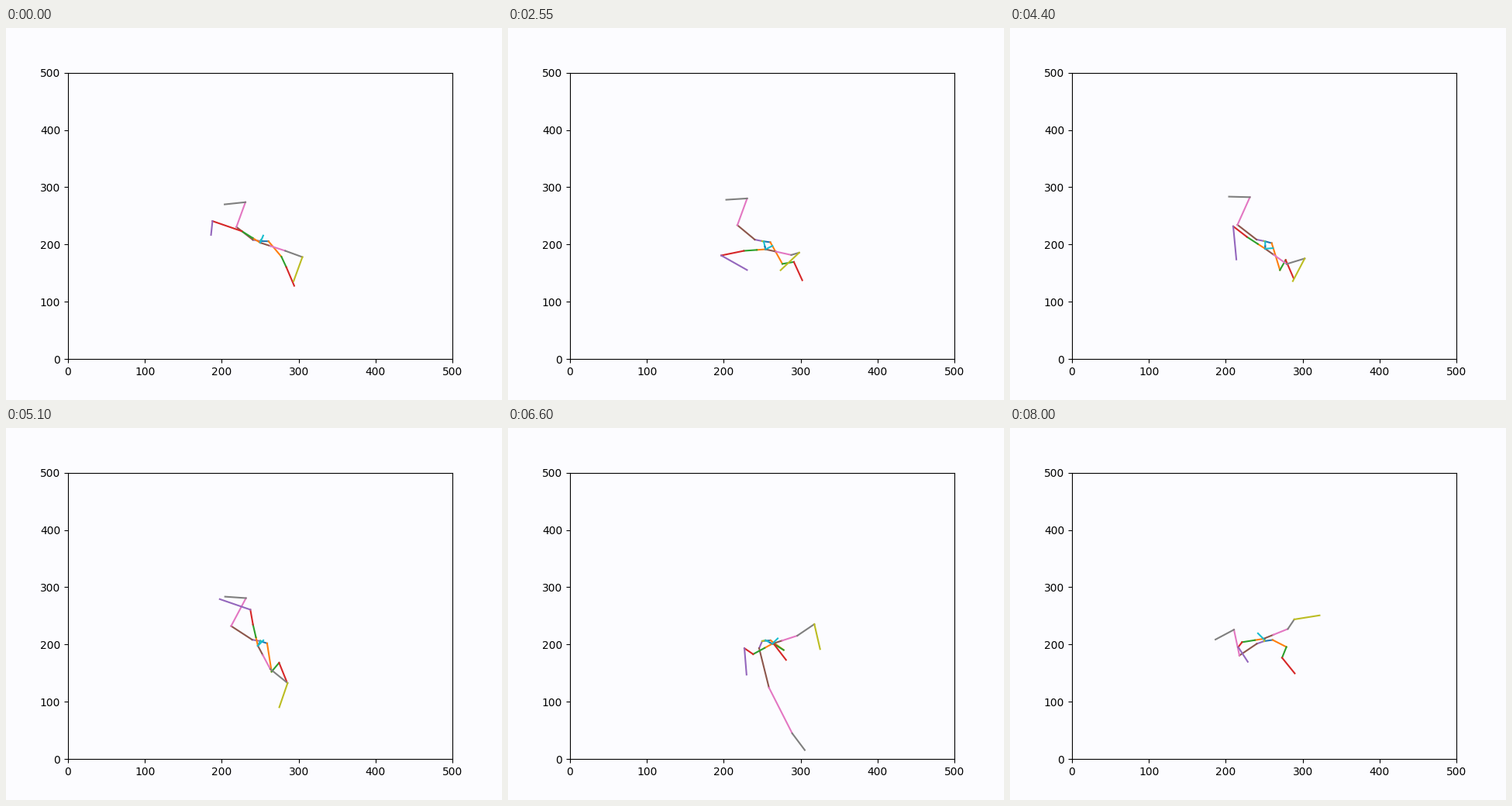
Animation of 640 by 480 pixels, one loop 8.05 s. Source, as a matplotlib script:

```python
import numpy as np
import matplotlib.pyplot as plt
from matplotlib.animation import FuncAnimation

W, H, DPI = 640, 480, 100
FRAMES, STEP = 161, 50
PAPER = "#fcfcff"

POSES = (0, 1.55, 3.65, 5.1, 6, 7.2, 8)  # seconds
KICK = (0, 3.65, 5.1, 6, 6.8, 7.2, 8)
ROOT = np.array([328, 275])


def track(values, times=POSES):
    """Smooth curve through the key values that never overshoots them."""
    t, p = np.array(times, float), np.array(values, float)
    h = np.diff(t)
    d = np.diff(p) / h
    same = d[:-1] * d[1:] > 0
    m = np.r_[d[0], np.where(same, 2 * d[:-1] * d[1:]
                             / np.where(same, d[:-1] + d[1:], 1), 0), d[-1]]

    def at(s):
        i = min(np.searchsorted(t, s, side="right") - 1, len(t) - 2)
        u = (s - t[i]) / h[i]
        return ((1 + 2 * u) * (1 - u) ** 2 * p[i] + u * (1 - u) ** 2 * h[i] * m[i]
                + u * u * (3 - 2 * u) * p[i + 1] + u * u * (u - 1) * h[i] * m[i + 1])

    return at


# Angles are in degrees, clockwise from the right; lengths are in pixels.
chest_x = track((0, 2, 6, -3, 22, 2, -1))
chest_y = track((2, 6, 14, 6, 12, -5, -3))
head_turn = track((-67, -85, 41, -45, 56, -145, -135))

l_thigh = track((50, 59, 63, 81, 41, 33, 27))
l_reach = track((26, 29, 35, 37, 28, 17, 20))
l_shin = track((65, 52, -72, -50, -156, -141, -248))
l_foot = track((67, 66, 65, 68, 53, 52, 51))

r_thigh = track((218, 220, 213, 197, 55, 60, 146), KICK)
r_shin = track((290, 290, 298, 231, 37, 40, 258), KICK)
r_foot = track((174, 178, 184, 180, 30, 71, 152), KICK)
r_reach = track((1, 1.12, 1.2, 1.87, 1.95, 1.45, 1), KICK)

l_shoulder = track((212, 193, 164, 257, 121, 182, 171))
l_upper = track((199, 168, 170, 260, 234, 189, 127))
l_fore = track((96, 52, 16, 199, 359, 491, 417))

r_shoulder = track((18, 18, 6, 62, -25, -11, -22))
r_upper = track((20, 38, -79, 39, -95, 27, -56))
r_fore = track((110, 143, 124, 109, 59, 95, -9))


def polar(length, angle):
    a = np.radians(angle)
    return length * np.array([np.cos(a), np.sin(a)])


def leg(side, thigh, shin, foot):
    """The hip gives way a little in the direction of the thigh."""
    hip = np.array(side) + 0.16 * thigh
    return ROOT + np.cumsum([(0, 0), hip, thigh, shin, foot], axis=0)


def arm(chest, shoulder, upper, fore):
    return chest + np.cumsum([(0, 0), 0.4 * shoulder, 0.6 * shoulder, upper, fore],
                             axis=0)


def chains(s):
    lean = np.array([chest_x(s), chest_y(s)])
    chest = ROOT + lean
    spine = ROOT + 0.25 * lean + (1, -2)
    thorax = spine + 0.65 * (chest - spine)
    reach = r_reach(s)
    # Foreshortening of the arms as the body turns.
    l_up = 40 - 4 * s
    l_low = 18 + 25 * np.sin(np.pi * s / 8.5)
    r_up = 20 - 10 * np.sin(2 * np.pi * (s - 0.4) / 7)
    return [
        leg((8, -3), polar(l_reach(s), l_thigh(s)), polar(15, l_shin(s)),
            polar(26, l_foot(s))),
        leg((-6, 1), polar(27 * reach, r_thigh(s)), polar(34 * reach, r_shin(s)),
            polar(27, r_foot(s))),
        np.array([ROOT, spine, thorax, chest]),
        arm(chest, polar(28, l_shoulder(s)), polar(l_up, l_upper(s)),
            polar(l_low, l_fore(s))),
        arm(chest, polar(34, r_shoulder(s)), polar(r_up, r_upper(s)),
            polar(33, r_fore(s))),
        np.array([chest, chest + polar(10, head_turn(s))]),
    ]


def to_data(xy):
    x = (xy[:, 0] - 0.125 * W) / (0.775 * W) * 500
    y = (0.89 * H - xy[:, 1]) / (0.77 * H) * 500
    return x, y


fig, ax = plt.subplots(figsize=(W / DPI, H / DPI), dpi=DPI, facecolor=PAPER)
fig.subplots_adjust(left=0.125, right=0.9, bottom=0.11, top=0.88)
ax.set_facecolor(PAPER)
ax.set(xlim=(0, 500), ylim=(0, 500))
bones = [ax.plot([], [], color=f"C{i % 10}", lw=1.5)[0] for i in range(20)]


def draw(frame):
    pairs = [c[i:i + 2] for c in chains(frame * STEP / 1000)
             for i in range(len(c) - 1)]
    for bone, ends in zip(bones, pairs):
        bone.set_data(*to_data(ends))
    return bones


anim = FuncAnimation(fig, draw, frames=FRAMES, interval=STEP,
                     repeat=True, repeat_delay=0, blit=False)
plt.show()
```
